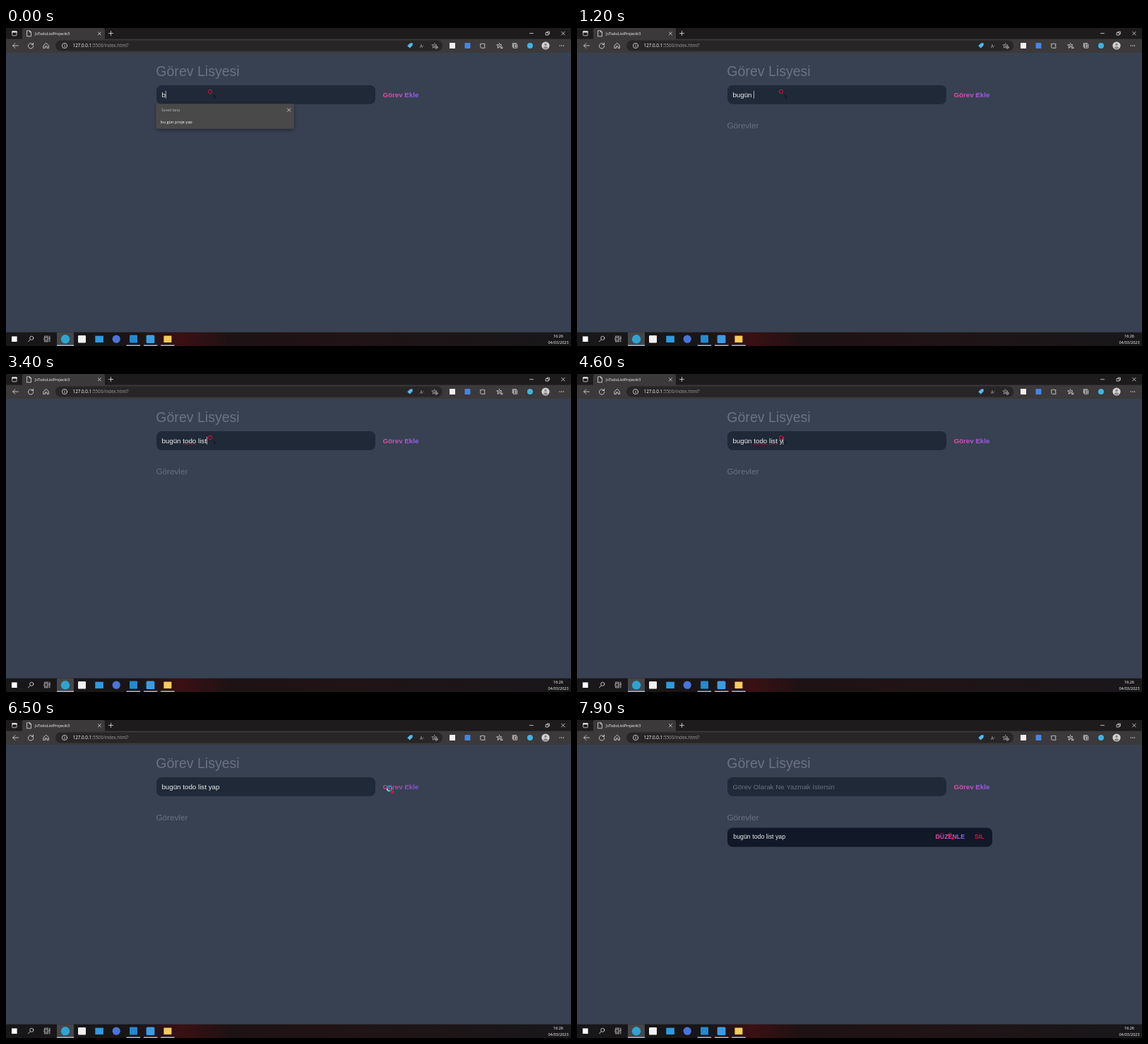
Recreate the animation shown at these times as an HTML page. Size 800 px wide and 450 px high, loop 8000 ms.

```html
<!DOCTYPE html>
<html lang="tr">
<head>
<meta charset="utf-8">
<title>Görev Lisyesi</title>
<style>
  html, body { margin: 0; width: 100%; height: 100%; overflow: hidden; background: #374151; }
  svg { display: block; width: 100vw; height: 100vh; }
  text { font-family: "Liberation Sans", Arial, sans-serif; white-space: pre; }
  .ui text { font-family: "Open Sans", "Noto Sans", sans-serif; }
  .line { fill: none; stroke: #e4e2e3; stroke-width: .8; stroke-linecap: round; stroke-linejoin: round; }
  .field { font-size: 9.78px; }
  .item { font-size: 8.8px; }
  .bold { font-weight: bold; }
  .grey { fill: #6b7280; }
</style>
</head>
<body>
<svg viewBox="0 0 800 450">
  <defs>
    <linearGradient id="accent">
      <stop offset="0" stop-color="#ec4899"/><stop offset="1" stop-color="#8b5cf6"/>
    </linearGradient>
    <linearGradient id="bar">
      <stop offset="0" stop-color="#181719"/><stop offset=".23" stop-color="#191516"/>
      <stop offset=".31" stop-color="#3a1013"/><stop offset=".4" stop-color="#1d1214"/>
      <stop offset=".55" stop-color="#211315"/><stop offset="1" stop-color="#18171a"/>
    </linearGradient>
    <filter id="shadow" x="-10%" y="-20%" width="120%" height="150%">
      <feDropShadow dx="0" dy="2" stdDeviation="2.5" flood-opacity=".4"/>
    </filter>
  </defs>
  <rect width="800" height="450" fill="#374151"/>

  <!-- page -->
  <text class="grey" x="212.3" y="68.4" font-size="19.56">Görev Lisyesi</text>
  <rect x="213" y="81" width="310" height="26.8" rx="7.5" fill="#1f2937"/>
  <text id="typed" class="field" x="220.4" y="97.6" fill="#eee"></text>
  <text id="hint" class="field grey" x="220.4" y="97.6">Görev Olarak Ne Yazmak İstersin</text>
  <g fill="none" stroke="#d5253c" stroke-width=".7" stroke-dasharray="1.2 .6">
    <path id="wave1" d="M250.5 99.4H270"/><path id="wave2" d="M272 99.4H284"/>
  </g>
  <rect id="caret" y="88.8" width=".7" height="10.8" fill="#eee"/>
  <text id="add" class="field bold" x="533.4" y="97.6" fill="url(#accent)">Görev Ekle</text>
  <text class="grey" x="212.4" y="142" font-size="11.73">Görevler</text>
  <g id="task" class="item">
    <rect x="213" y="152.4" width="375" height="27" rx="7.5" fill="#111827"/>
    <text x="221.3" y="168.4" fill="#eee">bugün todo list yap</text>
    <text class="bold" x="507.5" y="168.4" fill="url(#accent)">DÜZENLE</text>
    <text class="bold" x="562.9" y="168.4" fill="crimson">SIL</text>
  </g>
  <g id="popup" class="ui">
    <rect x="212.6" y="107.2" width="195.2" height="35.4" rx="1.5" fill="#4a4848" filter="url(#shadow)"/>
    <text x="220" y="118" font-size="5.1" fill="#bbb9ba">Saved data</text>
    <text x="219" y="135" font-size="5.7" fill="#fff">bu gün proje yap</text>
    <path class="line" d="m398.4 113.8 4.4 4.4m0-4.4-4.4 4.4"/>
  </g>

  <!-- browser chrome -->
  <g class="ui">
    <rect width="800" height="16" fill="#1d1b1c"/>
    <rect y="15.5" width="800" height="19.5" fill="#3b393a"/>
    <path d="M23 16V3q0-3 3-3h111q3 0 3 3v13z" fill="#3b393a"/>
    <text x="41" y="9.8" font-size="5.5" fill="#fff">JsTodoListProjeckt3</text>
    <rect x="70" y="17.6" width="548" height="14.8" rx="7.4" fill="#272526"/>
    <text x="94.6" y="27.3" font-size="6.3" fill="#fff">127.0.0.1<tspan fill="#a09e9f">:5500/index.html?</tspan></text>
    <g class="line">
      <rect x="8.7" y="4.6" width="6.4" height="6.2" rx="1"/><path d="M9 5.5h6" stroke-width="2"/>
      <path d="M30 3.8h3.5l2 2v6h-5.5zM33.5 3.8v2h2"/>
      <path d="m130.4 5.8 4 4m0-4-4 4M148.5 4.5v6m-3-3h6"/>
      <path d="M741.5 7.6h5M764.5 6.6h3.4V10h-3.4zM766 6.4V5.2h3.4v3.4h-1.2M786.6 5.3l4.6 4.6m0-4.6-4.6 4.6"/>
      <path d="M17.4 25H9.7m3.2-3.3L9.7 25l3.2 3.3"/>
      <path d="M38.1 23.2A3.7 3.7 0 1 0 38.8 25M38.6 21v2.4h-2.4"/>
      <path d="m53.2 24.6 3.6-3.3 3.6 3.3v3.8h-2.3v-2.6h-2.6v2.6h-2.3z"/>
      <circle cx="83" cy="25" r="3.6"/><path d="M83 24.6v2M83 23v.1"/>
      <path d="m671.8 22.6 1.6.1q.8-2.2 2.3-.2h2.3v1.6q-2.2.7 0 2.2v2h-5q-1.9-.6-1.2-2.4-1-.8 0-1.5z"/>
      <path id="star" d="m698.4 21.2 1.1 2.4 2.5.3-1.9 1.8.3 1.4m-2 .1-2.3 1.1.5-2.6-1.9-1.8 2.6-.3zM700.5 27h2.6m-2.6 1.6h2.6"/>
      <path d="M717.3 27v-5.3h5.2M718.8 23h5v5.2h-5zM721.3 24.3v2.6m-1.3-1.3h2.6"/>
      <path stroke="#aaa" d="m606.4 21.3 1 2.3 2.5.3-1.8 1.7m-1.7 1.5-2.2 1.1.5-2.6-1.9-1.7 2.6-.3z"/>
      <circle cx="609.3" cy="27.3" r="2" stroke="#aaa"/><path stroke="#aaa" d="M609.3 26.4v1.8m-.9-.9h1.8"/>
    </g>
    <path d="m568.2 25.3 3.8-3.9 3.5-.3.2 3.4-3.9 4z" fill="#55b9ee"/>
    <text x="586" y="27.5" font-size="6.3" fill="#aaa">A<tspan dy="-1.5" font-size="4">»</tspan></text>
    <rect x="628" y="21" width="8" height="8" fill="#f2f2f2"/>
    <rect x="649.5" y="21" width="8" height="8" rx="1" fill="#4585e6"/>
    <circle cx="742" cy="25" r="4" fill="#3fb3e3"/>
    <circle cx="764" cy="25" r="5.6" fill="#d4d2d2"/>
    <circle cx="764" cy="23.4" r="1.8" fill="#8b898a"/><path d="M760.4 28.2q3.6-4.6 7.2 0-3.6 3-7.2 0" fill="#8b898a"/>
    <g fill="#e4e2e3"><circle cx="784.2" cy="25" r=".7"/><circle cx="786.8" cy="25" r=".7"/><circle cx="789.4" cy="25" r=".7"/></g>
  </g>

  <!-- taskbar -->
  <g class="ui">
    <rect y="430.6" width="800" height="19.4" fill="url(#bar)"/>
    <rect x="72" y="430.6" width="24" height="19.4" fill="#454649"/>
    <rect x="8" y="436.4" width="7.6" height="7.6" fill="#fff"/>
    <g class="line">
      <circle cx="36.3" cy="438.8" r="2.6"/><path d="m34.3 440.8-2.8 3"/>
      <path d="M54.5 437v-.8h5v.8M54.5 443v.8h5v-.8M54.5 438.4h5v3.2h-5zM61.8 436v8M61.3 439h1"/>
    </g>
    <circle cx="84" cy="440.3" r="6.2" fill="#2fa4d2"/>
    <rect x="102" y="435" width="11" height="10.6" rx="1" fill="#f1f1f1"/>
    <rect x="126.3" y="435.6" width="11.6" height="9.4" fill="#2c9be0"/>
    <circle cx="156.2" cy="440.2" r="5.6" fill="#4a74d9"/>
    <rect x="175" y="434.6" width="11" height="11" rx="1" fill="#2389d0"/>
    <rect x="198.6" y="434.4" width="11.8" height="11.6" rx="1.5" fill="#3a9de2"/>
    <rect x="223.4" y="435.6" width="11" height="9.4" rx=".5" fill="#f6cc5b"/>
    <path d="M72 449.2h24M170.6 449.2h19.4M195 449.2h19.4M219.2 449.2h19.4" stroke="#9db8d0" stroke-width="1.4"/>
    <g font-size="5.5" fill="#fff" text-anchor="middle"><text x="782" y="437.9">16:26</text><text x="782" y="446.9">04/03/2023</text></g>
  </g>

  <!-- pointer, placed by the centre of its ring -->
  <g id="pointer" fill="none">
    <circle id="ring" r="2.6" stroke="#c8102e" stroke-width="1.2"/>
    <g id="busy">
      <circle r="3.4" stroke="#2f8fc4" stroke-width="1.7"/>
      <path id="spin" d="M0-3.4A3.4 3.4 0 0 1 3.4 0" stroke="#a5dcf5" stroke-width="1.7"/>
    </g>
    <path id="beam" d="M4.6 4.4q1 0 1.4.8l.3 3q.3.8 1.5.8M5 7h2.4" stroke="#10141b" stroke-width="1"/>
    <circle id="dot" cx="4" cy="4.6" r="2.4" fill="#d8142f"/>
  </g>
</svg>
<script>
const LOOP = 8000, STEP = 100;
const MESSAGE = "bugün todo list yap";
// Time at which each letter of the message is typed.
const KEYS = [0, 100, 300, 700, 1000, 1200, 1600, 1800, 2000, 2200, 2500,
              2800, 3000, 3100, 3300, 3800, 4600, 4700, 4900];
const POPUP_OUT = 400, CLICK = 6500, ADDED = 6600, IDLE = 7300;
const PATH = [[0, 289, 90], [5600, 289, 90], [6400, 543, 97], [6600, 543, 97],
              [7100, 366, 160], [7400, 353, 161], [7600, 353, 161], [7900, 528, 163]];

const el = id => document.getElementById(id);
const show = (id, on) => { el(id).style.display = on ? "" : "none"; };
const clamp = v => Math.min(1, Math.max(0, v));
const ease = p => p * p * (3 - 2 * p);

function pointerAt(t) {
  const next = PATH.findIndex(p => p[0] > t);
  if (next < 0) return PATH[PATH.length - 1].slice(1);
  const [t0, x0, y0] = PATH[next - 1], [t1, x1, y1] = PATH[next];
  const k = ease((t - t0) / (t1 - t0));
  return [x0 + (x1 - x0) * k, y0 + (y1 - y0) * k];
}

function draw(t) {
  const count = KEYS.filter(k => k <= t).length;
  const added = t >= ADDED, focused = t < CLICK;
  const typed = el("typed");
  typed.textContent = added ? "" : MESSAGE.slice(0, count);
  show("hint", added);
  show("task", added);

  const blinkOn = (t - KEYS[count - 1]) % 1000 < 500;
  show("caret", focused && blinkOn);
  if (focused) el("caret").setAttribute("x", 220.4 + typed.getSubStringLength(0, count));
  show("wave1", focused && count > 10);
  show("wave2", focused && count > 15);

  el("popup").style.opacity = 1 - clamp((t - POPUP_OUT + STEP) / 200);

  const [x, y] = pointerAt(t);
  const overText = x < 523 && y < 108, busy = t >= CLICK && t < IDLE;
  el("pointer").setAttribute("transform", `translate(${x} ${y})`);
  el("spin").setAttribute("transform", `rotate(${t * .36})`);
  el("dot").setAttribute("r", y > 120 ? 1.8 : 2.4);
  el("dot").setAttribute("cx", busy && y > 120 ? 2.4 : 4);
  el("dot").setAttribute("cy", busy && y > 120 ? 3 : 4.6);
  show("busy", busy);
  show("ring", !busy);
  show("beam", overText);
  show("dot", !overText);
  el("add").style.opacity = x > 533 && y < 108 ? .8 : 1;
}

const start = performance.now();
(function frame() {
  const t = (performance.now() - start) % LOOP;
  draw(Math.floor(t / STEP) * STEP);
  requestAnimationFrame(frame);
})();
</script>
</body>
</html>
```
